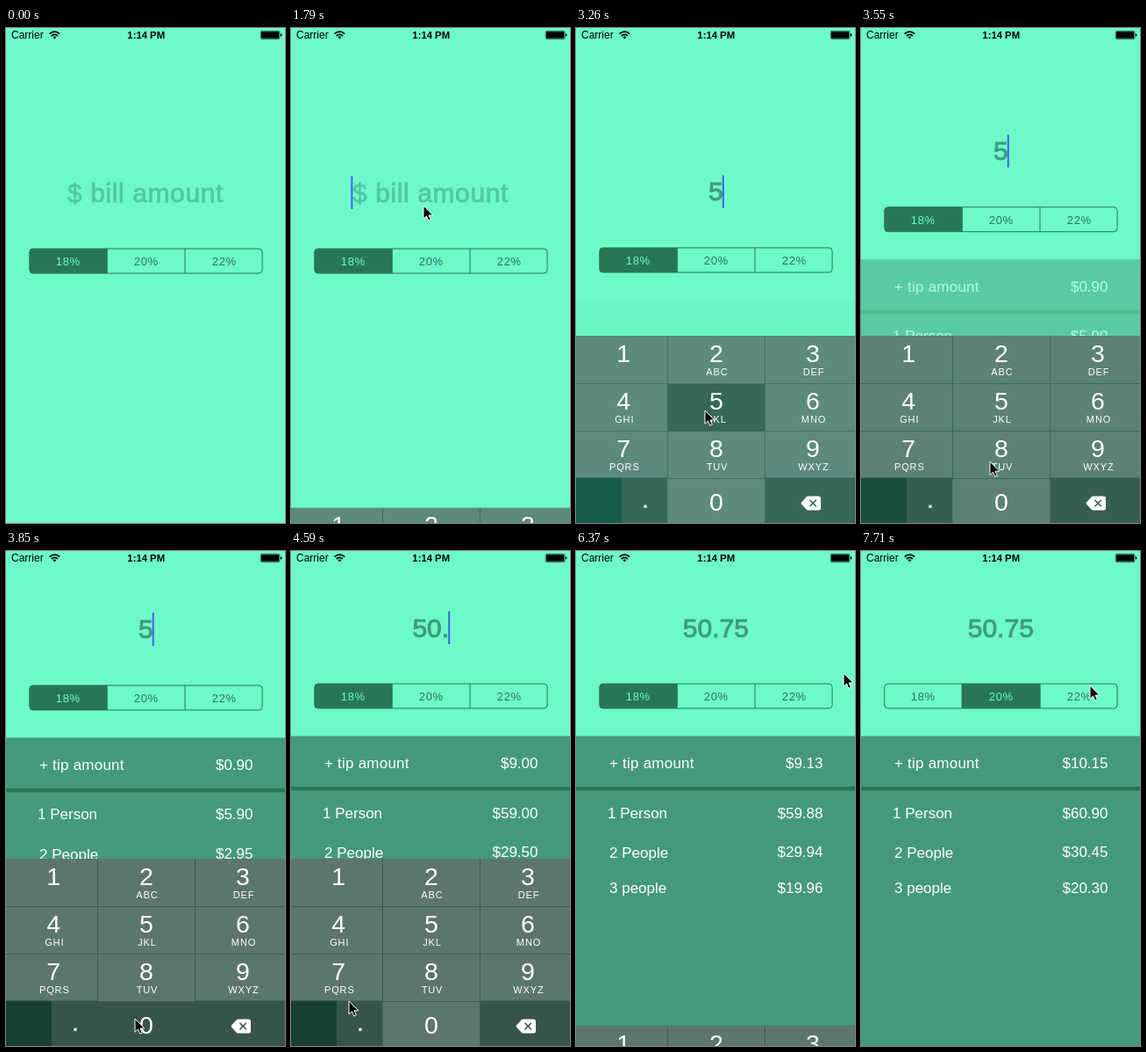
These frames come from a looping animation (318 by 563 pixels, 8 s). An HTML page:

```html
<!DOCTYPE html>
<html lang="en">
<head>
<meta charset="utf-8">
<title>Tip calculator</title>
<style>
  html, body { margin: 0; width: 100%; height: 100%; overflow: hidden; background: #6dfac8; }
  svg { display: block; width: 100%; height: 100%; }
  text { font-family: "Liberation Sans", Arial, sans-serif; white-space: pre; }
</style>
</head>
<body>
<svg id="stage" viewBox="0 0 318 563"></svg>
<script>
const LOOP = 8000;
const BG = '#6dfac8', DARK = '#277658', PANEL = '#45997b';
const stage = document.getElementById('stage');

function add(parent, tag, attrs, text) {
  const el = document.createElementNS('http://www.w3.org/2000/svg', tag);
  for (const k in attrs) el.setAttribute(k, attrs[k]);
  if (text !== undefined) el.textContent = text;
  parent.appendChild(el);
  return el;
}
const rect = (p, x, y, width, height, fill) => add(p, 'rect', { x, y, width, height, fill });
const label = (p, x, y, size, fill, text, more) =>
  add(p, 'text', { x, y, 'font-size': size, fill, ...more }, text);
const set = (el, k, v) => el.setAttribute(k, v);
const MID = { 'text-anchor': 'middle' }, END = { 'text-anchor': 'end' };

rect(stage, 0, 0, 318, 563, BG);

// Status bar
label(stage, 6, 12, 12, '#000', 'Carrier');
label(stage, 159.7, 12, 11.3, '#000', '1:14 PM', { ...MID, 'font-weight': 700 });
const wifi = add(stage, 'g', { fill: 'none', stroke: '#000', 'stroke-width': 1.7 });
add(wifi, 'path', { d: 'M49.6 6.6Q55.4 1.6 61.2 6.6M51.8 9Q55.4 5.8 59 9' });
add(wifi, 'path', { d: 'M53.4 10.3Q55.4 8.7 57.4 10.3L55.4 12.4Z', fill: '#000', stroke: 'none' });
add(stage, 'rect', { x: 290.3, y: 3.4, width: 21.6, height: 9.2, rx: 1.4, fill: 'none', stroke: '#000', 'stroke-width': .6 });
add(stage, 'rect', { x: 291, y: 4.2, width: 20.2, height: 7.6, rx: .6 });
add(stage, 'path', { d: 'M312.9 6.3q1.6 .3 1.6 1.7t-1.6 1.7z' });

// Content that slides up
const content = add(stage, 'g', {});
const hint = label(content, 70, 197.7, 30, '#52c8a0', '$ bill amount',
  { stroke: '#52c8a0', 'stroke-width': .8, 'letter-spacing': .6 });
const amount = label(content, 159.3, 197.5, 30, '#409c7c', '',
  { ...MID, stroke: '#409c7c', 'stroke-width': 1 });
const caret = rect(content, 0, 168.5, 2, 37.5, '#435fe9');

const segs = ['18%', '20%', '22%'].map((text, i) => ({
  box: add(content, 'path', {
    d: [
      'M115.5 251H30.8a4 4 0 0 0-4 4v20a4 4 0 0 0 4 4H115.5z',
      'M115 251H204.3V279H115z',
      'M204 251H288.1a4 4 0 0 1 4 4v20a4 4 0 0 1-4 4H204z'
    ][i]
  }),
  text: label(content, 70.8 + i * 89, 269.8, 13, DARK, text, { ...MID, 'letter-spacing': .7 })
}));
add(content, 'path', {
  d: 'M30.8 251H288.1a4 4 0 0 1 4 4v20a4 4 0 0 1-4 4H30.8a4 4 0 0 1-4-4v-20a4 4 0 0 1 4-4zM115.1 251V279M204 251V279',
  fill: 'none', stroke: DARK
});

const panel = add(content, 'g', {});
rect(panel, 0, 310.5, 318, 400, PANEL);
rect(panel, 0, 368, 318, 4.5, DARK);
const values = [
  ['+ tip amount', 38, 347, 347, .22], ['1 Person', 36, 403.6, 403.6, 0],
  ['2 People', 38, 449, 448, 0], ['3 people', 38, 489, 489, 0]
].map(([text, x, y, vy, gap]) => {
  label(panel, x, y, 17, '#fff', text, { 'letter-spacing': gap });
  return label(panel, 281.5, vy, 17, '#fff', '', END);
});

// Keypad
const pad = add(stage, 'g', {});
const padBase = rect(pad, 0, 350, 318, 230);
const colX = [0, 105, 216, 318], midX = [54.3, 160, 270];
const keys = {};
function key(id, x, y, w, h, special) {
  keys[id] = { el: rect(pad, x, y, w, h), special };
}
['', 'ABC', 'DEF', 'GHI', 'JKL', 'MNO', 'PQRS', 'TUV', 'WXYZ'].forEach((letters, i) => {
  const c = i % 3, y = 350 + 54 * (i / 3 | 0), top = i < 3 ? y : y + 1;
  key(i + 1, colX[c], top, colX[c + 1] - colX[c] - (c < 2), y + 54 - top);
  label(pad, midX[c], y + 29.5, 28.5, '#fff', i + 1, MID);
  label(pad, midX[c] + 1, y + 45, 11, '#fff', letters, { ...MID, 'letter-spacing': .9 });
});
const corner = rect(pad, 0, 511.5, 52, 51.5);
key('.', 52, 511.5, 52, 51.5, true);
key('0', 104.5, 513, 111, 50);
key('del', 215.5, 511.5, 102.5, 51.5, true);
label(pad, midX[1], 549, 28.5, '#fff', '0', MID);
rect(pad, 77.4, 542.6, 3.2, 3.2, '#fff');
add(pad, 'path', { d: 'M264.5 532.5H276.5a2.5 2.5 0 0 1 2.5 2.5v11a2.5 2.5 0 0 1-2.5 2.5H264.5q-1 0-1.8-.8L257 541.5q-.8-1 0-2L262.7 533.3q.8-.8 1.8-.8z', fill: '#fff' });
const cross = add(pad, 'path', { d: 'M266.5 536.7l7.4 7.6m0-7.6l-7.4 7.6', 'stroke-width': 1.6 });

const pointer = add(stage, 'path', {
  d: 'M0 0V15.2L3.5 11.9L5.8 17.2L8.3 16.1L6 11H10.8Z',
  fill: '#000', stroke: '#fff', 'stroke-width': 1, 'stroke-linejoin': 'round'
});

// Timing
const path = [
  [900, 264, 361], [1340, 151, 202], [1850, 151, 202], [2900, 147, 435],
  [3330, 147, 435], [3720, 147, 532], [4130, 147, 532], [4370, 76, 533],
  [4520, 76, 533], [4680, 52, 482], [4820, 52, 482], [5040, 160, 435],
  [5390, 160, 435], [5490, 225, 426], [5930, 305, 139], [6380, 305, 139],
  [6530, 258, 151], [6860, 160, 160], [7150, 160, 160], [7650, 261, 153]
];
const presses = [['5', 2990, 3340], ['0', 3800, 4130], ['.', 4380, 4540], ['7', 4690, 4840], ['5', 5100, 5450]];
const typing = [[3150, '5'], [3990, '50'], [4430, '50.'], [4740, '50.7'], [5150, '50.75']];
const SHOW = 1755, HIDE = 6078, PICK = 7000;

const clamp = v => Math.min(1, Math.max(0, v));
const smooth = u => u * u * (3 - 2 * u);
const spring = ms => { const x = Math.max(0, ms) * .013; return 1 - (1 + x) * Math.exp(-x); };
const mix = (a, b, u) => `rgb(${a.map((v, i) => Math.round(v + (b[i] - v) * u))})`;
const money = v => '$' + (Math.ceil(v * 100 - .5 - 1e-6) / 100).toFixed(2);

function pointerAt(t) {
  const i = path.findIndex(p => p[0] > t);
  if (i < 0) return path[path.length - 1].slice(1);
  if (i === 0) return path[0].slice(1);
  const a = path[i - 1], b = path[i], u = smooth((t - a[0]) / (b[0] - a[0]));
  return [a[1] + (b[1] - a[1]) * u, a[2] + (b[2] - a[2]) * u];
}

function draw(t) {
  const typed = typing.reduce((s, [at, text]) => t >= at ? text : s, '');
  const rise = smooth(clamp((t - 3220) / 687));
  set(content, 'transform', `translate(0 ${-100 * rise})`);
  set(panel, 'opacity', rise);

  hint.style.display = typed ? 'none' : '';
  amount.textContent = typed;
  const width = [...typed].reduce((w, c) => w + (c === '.' ? .278 : .556) * 30, 0);
  set(caret, 'x', typed ? 158.4 + width / 2 : 68.4);
  caret.style.display = t >= SHOW && t < HIDE - 40 ? '' : 'none';

  const picked = t < PICK ? 0 : 1;
  segs.forEach((s, i) => {
    set(s.box, 'fill', i === picked ? DARK : 'none');
    set(s.text, 'fill', i === picked ? BG : DARK);
  });
  const bill = +typed || 0, tip = bill * (picked ? .2 : .18);
  [tip, bill + tip, (bill + tip) / 2, (bill + tip) / 3].forEach((v, i) => values[i].textContent = money(v));

  // The keypad is translucent, so it darkens as the panel appears behind it
  const light = mix([92, 138, 124], [92, 118, 109], rise);
  const deep = mix([54, 104, 90], [54, 84, 74], rise);
  set(padBase, 'fill', mix([62, 112, 98], [62, 90, 81], rise));
  set(corner, 'fill', mix([23, 92, 72], [23, 63, 51], rise));
  for (const id in keys) {
    const down = presses.some(([k, a, b]) => k === id && t >= a && t < b);
    set(keys[id].el, 'fill', !!keys[id].special !== down ? deep : light);
  }
  set(cross, 'stroke', deep);
  const shown = t < HIDE ? spring(t - SHOW) : 1 - spring(t - HIDE);
  set(pad, 'transform', `translate(0 ${213 * (1 - shown)})`);
  pad.style.display = t >= SHOW && t < 6800 ? '' : 'none';

  pointer.style.display = t >= 895 ? '' : 'none';
  set(pointer, 'transform', `translate(${pointerAt(t)})`);
}

const start = performance.now();
function tick() {
  draw((performance.now() - start) % LOOP);
  requestAnimationFrame(tick);
}
tick();
</script>
</body>
</html>
```
